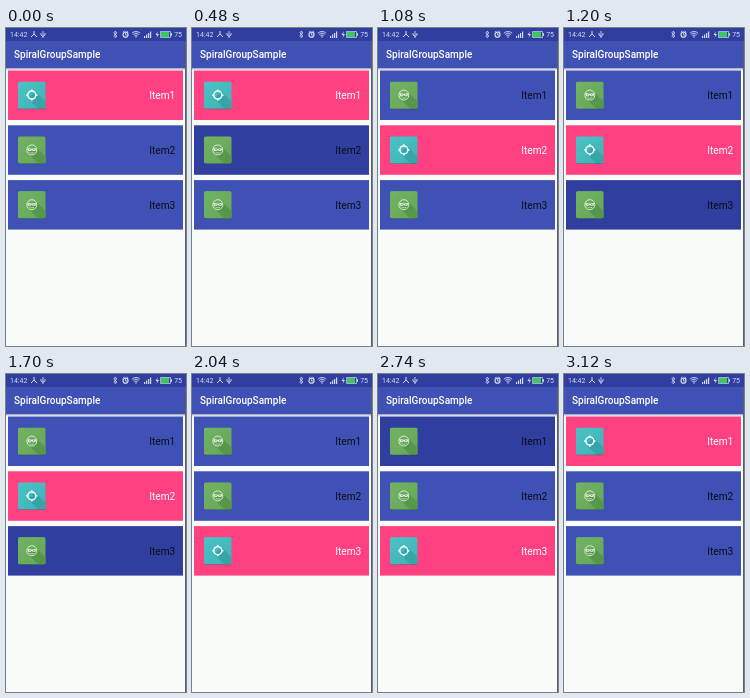
These frames come from a looping animation (180x318 px, 3240 ms). An HTML page with a canvas:

```html
<!DOCTYPE html>
<html lang="en">
<head>
<meta charset="utf-8">
<title>Group selection</title>
<style>
html, body { margin: 0; width: 100%; height: 100%; overflow: hidden; background: #f9fbf9; }
canvas { display: block; width: 180px; height: 318px; }
</style>
</head>
<body>
<canvas id="stage"></canvas>
<script>
const W = 180, H = 318, LOOP = 3240;
const COLORS = { dark: '#303f9f', blue: '#3f51b5', pink: '#ff4081', page: '#f9fbf9' };
const ROW = { x: 2, top: 42.5, width: 175, height: 49.5, step: 54.8 };

// Each state starts at its time and holds until the next one.
const STATES = [
  { at: 0, selected: 0, pressed: -1 },
  { at: 480, selected: 0, pressed: 1 },
  { at: 1080, selected: 1, pressed: -1 },
  { at: 1200, selected: 1, pressed: 2 },
  { at: 2040, selected: 2, pressed: -1 },
  { at: 2160, selected: 2, pressed: 0 },
  { at: 3120, selected: 0, pressed: -1 }
];

const canvas = document.getElementById('stage');
const ctx = canvas.getContext('2d');
const scale = window.devicePixelRatio || 1;
canvas.width = W * scale;
canvas.height = H * scale;

function rect(x, y, w, h, color) {
  ctx.fillStyle = color;
  ctx.fillRect(x, y, w, h);
}

function text(value, x, y, font, color, align = 'left') {
  ctx.font = font + ' Roboto, sans-serif';
  ctx.textAlign = align;
  ctx.fillStyle = color;
  ctx.fillText(value, x, y);
}

function line(path, color, width) {
  ctx.strokeStyle = color;
  ctx.lineWidth = width;
  ctx.stroke(new Path2D(path));
}

function shape(path, color) {
  ctx.fillStyle = color;
  ctx.fill(new Path2D(path));
}

function arc(x, y, r, from, to, color, width) {
  ctx.beginPath();
  ctx.arc(x, y, r, from, to);
  ctx.strokeStyle = color;
  ctx.lineWidth = width;
  ctx.stroke();
}

function circle(x, y, r, color, width) {
  arc(x, y, r, 0, Math.PI * 2, color, width);
}

function statusBar() {
  const pale = '#d5d9ef';
  rect(0, 0, W, 13, COLORS.dark);
  text('14:42', 4, 9, '7px', pale);
  line('M28 3V6L25 9M28 6L31 9', pale, 1);
  line('M37 3V10M35 5V7L37 8.5L39 7V5', pale, 0.9);
  line('M107.5 4.5L111 8L109 9.7V3L111 4.8L107.5 8.2', pale, 0.8);
  circle(119.5, 6.7, 2.5, pale, 1.2);
  line('M116.8 4.3L118.3 3M120.7 3L122.2 4.3M119.5 5.2V7H121', pale, 0.9);
  for (const r of [2.2, 4, 5.8]) {
    arc(130, 9.3, r, -Math.PI * 0.75, -Math.PI * 0.25, pale, 0.9);
  }
  shape('M129 8.5H131L130 10Z', pale);
  for (let i = 0; i < 4; i++) rect(138 + i * 2, 8 - i * 1.5, 1.2, 2 + i * 1.5, pale);
  shape('M152 3L149.5 7H151.3L150.5 10L153 6H151.2Z', pale);
  line('M154.5 3.5H164.5V9.5H154.5Z', pale, 0.7);
  rect(155, 4, 8, 5, '#39c95b');
  rect(165, 5.2, 1, 2.6, pale);
  text('75', 176, 9, '7px', pale, 'right');
}

function toolbar() {
  rect(0, 13, W, 27.5, COLORS.blue);
  text('SpiralGroupSample', 8, 30, '500 10px', '#fff');
  const shade = ctx.createLinearGradient(0, 40.5, 0, 42.5);
  shade.addColorStop(0, '#b9bdc5');
  shade.addColorStop(1, COLORS.page);
  rect(0, 40.5, W, 2, shade);
}

function tile(y, light, base, shadow) {
  ctx.save();
  ctx.beginPath();
  ctx.roundRect(12, y + 11, 27.5, 27.5, 1.8);
  ctx.clip();
  const fill = ctx.createLinearGradient(12, y + 11, 39, y + 39);
  fill.addColorStop(0, light);
  fill.addColorStop(1, base);
  rect(12, y + 11, 28, 28, fill);
  ctx.translate(25.8, y + 24.6);
  shape('M3.6 -3.6L18 10.8V18H10.8L-3.6 3.6Z', shadow);
  ctx.restore();
  rect(12.5, y + 38, 26.5, 0.7, 'rgba(0,0,0,.25)');
}

function selectedIcon(y) {
  tile(y, '#4bc2c5', '#3fb3b7', '#37a4a8');
  ctx.save();
  ctx.translate(25.8, y + 24.6);
  circle(0, 0, 4, '#f4ffff', 1.5);
  for (let i = 0; i < 4; i++) {
    ctx.rotate(Math.PI / 2);
    line('M0 -4.2V-5.6', '#f4ffff', 1.6);
  }
  ctx.restore();
}

function idleIcon(y) {
  tile(y, '#72b263', '#65a657', '#57974b');
  ctx.save();
  ctx.translate(25.8, y + 24.6);
  circle(0, 0, 5, '#e6f2e2', 0.9);
  shape('M-4.5 -1.5Q-2 -2.2 0 -1Q2 -2.2 4.5 -1.5L3.5 1.1H1L0 0L-1 1.1H-3.5Z', '#e6f2e2');
  rect(-2.7, -0.8, 1.5, 1, '#65a657');
  rect(1.2, -0.8, 1.5, 1, '#65a657');
  line('M-2.2 2.7Q0 3.6 2.2 2.7', '#e6f2e2', 0.7);
  ctx.restore();
}

function row(index, state) {
  const y = ROW.top + index * ROW.step;
  const selected = index === state.selected;
  const color = selected ? COLORS.pink : index === state.pressed ? COLORS.dark : COLORS.blue;
  rect(ROW.x, y, ROW.width, ROW.height, color);
  (selected ? selectedIcon : idleIcon)(y);
  text('Item' + (index + 1), 169.3, y + 28.9, '10.2px', selected ? '#fff' : '#0b0d18', 'right');
}

function draw(now) {
  const time = now % LOOP;
  const state = STATES.findLast(s => s.at <= time);
  ctx.setTransform(scale, 0, 0, scale, 0, 0);
  rect(0, 0, W, H, COLORS.page);
  toolbar();
  statusBar();
  for (let i = 0; i < 3; i++) row(i, state);
  rect(179, 13, 1, H - 13, '#5b5e66');
}

let start;
function tick(now) {
  start ??= now;
  draw(now - start);
  requestAnimationFrame(tick);
}
draw(0);
requestAnimationFrame(tick);
</script>
</body>
</html>
```
